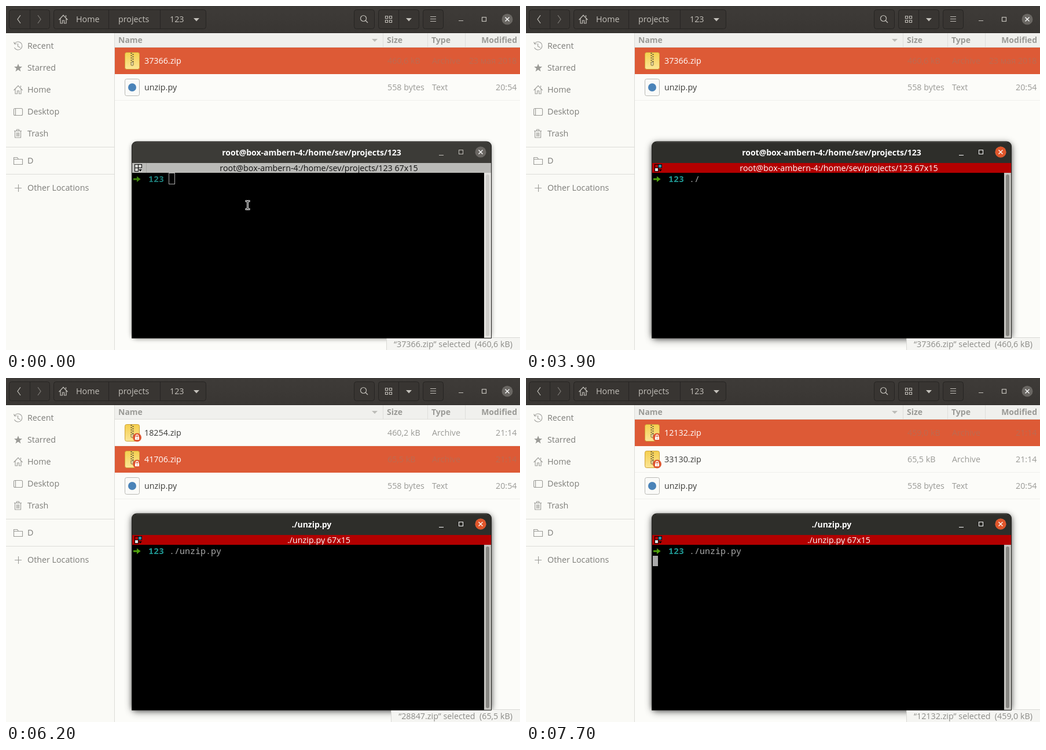
An HTML page that plays this animation: 888x596 px, repeating every 8000 ms.

```html
<!DOCTYPE html>
<html lang="en">
<head>
<meta charset="utf-8">
<title>Unzip script</title>
<style>
html, body { margin: 0; width: 100%; height: 100%; overflow: hidden; background: #fcfcf9; }
svg { display: block; width: 888px; height: 596px; }
text { font: 14.3px "Open Sans", "Noto Sans", sans-serif; white-space: pre; }
.b { font-weight: 700; font-size: 14px; }
.mono { font: 15px "Noto Sans Mono", "DejaVu Sans Mono", monospace; }
.mid { text-anchor: middle; }
.end { text-anchor: end; }
.line { fill: none; stroke: currentColor; }
</style>
</head>
<body>
<svg id="stage" viewBox="0 0 888 596">
  <defs>
    <linearGradient id="gold" x2="0" y2="1">
      <stop stop-color="#f5cf4e"/><stop offset="1" stop-color="#fbe596"/>
    </linearGradient>
    <linearGradient id="bar" x2="0" y2="1">
      <stop stop-color="#3e3b38"/><stop offset="1" stop-color="#393633"/>
    </linearGradient>
    <g id="zip">
      <rect x="205.5" y="8.5" width="25" height="29" rx="3" fill="url(#gold)" stroke="#cda136"/>
      <path d="M216.5 9v17M219.5 11v15" stroke="#6b6040" stroke-width="2" stroke-dasharray="2 2"/>
      <rect x="216" y="25" width="4" height="6" rx="1" fill="#e9d9a0" stroke="#7b6b3c"/>
    </g>
    <g id="page">
      <rect x="205.5" y="8.5" width="25" height="29" rx="3" fill="#fafaf8" stroke="#b9b9b5"/>
    </g>
    <g id="doc">
      <use href="#page"/>
      <path d="M210 16.5h12M210 19.5h16M210 22.5h15M210 25.5h16M210 28.5h9M210 31.5h8" stroke="#c6c6c3"/>
    </g>
    <g id="py"><use href="#page"/><circle cx="218" cy="23" r="7" fill="#4a83b8"/></g>
    <g id="lock">
      <circle cx="226.5" cy="31" r="7.5" fill="#de5833"/>
      <path d="M224.5 30v-1.5a2 2 0 0 1 4 0v1.5" fill="none" stroke="#fff" stroke-width="1.3"/>
      <rect x="223" y="30" width="7" height="5" rx=".5" fill="#fff"/>
      <path d="M226.5 31.5v2" stroke="#de5833"/>
    </g>
  </defs>

  <rect width="888" height="596" fill="#fcfcf9"/>
  <rect y="47" width="187" height="549" fill="#fafaf6"/>
  <path d="M187.5 47v549M0 244.5h187M0 291.5h187" stroke="#dcdcd8"/>

  <!-- file manager bar -->
  <rect width="888" height="47" fill="url(#bar)"/>
  <path d="M0 46.5h888" stroke="#2d2a28"/>
  <g id="buttons" fill="#383532" stroke="#262422"></g>
  <path d="M41.5 7v33M177.5 7v33M266.5 7v33M678.5 7v33" stroke="#262422"/>
  <g color="#c3c0ba" stroke-width="1.2">
    <path class="line" d="M25 16l-5 7 5 7"/>
    <path class="line" d="M55 16l5 7-5 7" color="#7f7c77"/>
    <path class="line" d="M91.5 24l7.500-8 7.500 8M94 22v8h3.500v-5h3v5h3.500v-8M103.500 19v-3"/>
    <circle class="line" cx="617.500" cy="21.500" r="5"/><path class="line" d="M621 25l4 4"/>
    <path class="line" d="M655.500 17.500h4v4h-4zM662.500 17.500h4v4h-4zM655.500 24.500h4v4h-4zM662.500 24.500h4v4h-4z"/>
    <path class="line" d="M733 18.500h10M733 22.500h10M733 26.500h10M782 25.500h8"/>
    <rect class="line" x="822.500" y="19.500" width="7" height="7"/>
    <path d="M324 21h10l-5 5.500zM691 21h10l-5 5.500z" fill="currentColor"/>
  </g>
  <circle cx="866" cy="23" r="9.500" fill="#6a6763"/>
  <path d="M862.500 19.500l7 7m0-7l-7 7" stroke="#fff" stroke-width="1.400"/>
  <g fill="#c3c0ba">
    <text x="121" y="28">Home</text><text x="194" y="28">projects</text><text x="283" y="28">123</text>
  </g>

  <!-- sidebar -->
  <g color="#9b9b97" stroke-width="1.100">
    <path class="line" d="M15 65a7 7 0 1 1-.5 7M13.500 62.500l1.500 3.500 3.500-.5M20.500 65v5l4 2"/>
    <path d="M21 100l2 5h5l-4 3.500 1.500 5-4.500-3-4.500 3 1.500-5-4-3.500h5z" fill="currentColor"/>
    <path class="line" d="M13.500 146l7.500-8 7.500 8M16 144v8h3.500v-5h3v5h3.500v-8M25.500 141v-3"/>
    <rect class="line" x="13.500" y="177.500" width="15" height="12" rx="2"/><path class="line" d="M16.500 178v11"/>
    <path class="line" d="M14 216.500h13M18.500 216v-2h4v2M15.500 217v11h10v-11M18.500 219v7M20.500 219v7M22.500 219v7"/>
    <path class="line" d="M13.500 274.500v-12h6l2 3h7v9zM13.500 265.500h8"/>
    <path class="line" d="M15 315.500h12M21.500 309v13"/>
  </g>
  <g id="places" fill="#7d7d79"></g>

  <!-- list -->
  <rect x="188" y="47" width="700" height="24" fill="#f0f0ed"/>
  <path d="M188 71.500h700M651.500 47v24M728.500 47v24M793.500 47v24" stroke="#dededa"/>
  <path d="M632 57h10l-5 5z" fill="#bcbcb8"/>
  <g fill="#9a9a96">
    <text class="b" x="194" y="64">Name</text><text class="b" x="658" y="64">Size</text>
    <text class="b" x="735" y="64">Type</text><text class="b end" x="883" y="64">Modified</text>
  </g>
  <g id="list"></g>

  <g id="shade">
    <rect x="218" y="238" width="620" height="338" rx="8" style="filter:blur(4px)" opacity=".5"/>
    <rect id="glow" x="217" y="238" width="622" height="341" rx="8" style="filter:blur(7px)" opacity="0"/>
  </g>
  <rect id="statusBox" y="574.500" height="23" fill="#f5f5f2" stroke="#d9d9d5"/>
  <text id="status" class="end" x="875" y="591" fill="#8b8b87"></text>

  <!-- terminal -->
  <path d="M217.500 575.500V243a8 8 0 0 1 8-8h605a8 8 0 0 1 8 8v332.500z" fill="#3c3b37" stroke="#22211f"/>
  <g id="active">
    <path d="M218 272v-29a8 8 0 0 1 8-8h604a8 8 0 0 1 8 8v29z" fill="#2e2e2a"/>
  </g>
  <path d="M225 236.500h606" stroke="#555450" stroke-opacity=".6"/>
  <circle cx="820" cy="253" r="9.500" fill="#6a6763"/>
  <circle id="close" cx="820" cy="253" r="9.500" fill="#e0562b"/>
  <path d="M816.500 249.500l7 7m0-7l-7 7" stroke="#fff" stroke-width="1.400"/>
  <g id="controls" class="line"><path d="M748 258.500h8"/><rect x="782.500" y="249.500" width="7" height="7"/></g>
  <text id="title" class="b mid" x="528" y="259" fill="#fff"></text>
  <rect id="tab" x="218" y="272" width="620" height="17"/>
  <g id="tabIcon">
    <rect x="222" y="274" width="13" height="13"/>
    <rect class="p" x="223" y="275" width="5" height="5"/><rect class="p" x="229" y="275" width="5" height="5"/>
    <rect class="p" x="223" y="281" width="5" height="5"/><rect class="p" x="229" y="281" width="6" height="6"/>
    <path d="M229 283h6l-3 3.500z"/>
  </g>
  <path id="tabEdge" d="M242.500 272v17" stroke="#a7a7a3"/>
  <text id="tabText" class="mid" x="540.500" y="286"></text>
  <rect x="218" y="289" width="608" height="286"/>
  <rect x="826" y="289" width="12" height="286" fill="#e4e3e0"/>
  <rect x="829" y="292" width="6" height="280" rx="3" fill="#cfcecb"/>
  <g id="scroll">
    <rect x="826" y="289" width="12" height="286" fill="#c5c4c0"/>
    <rect x="829" y="292" width="6" height="280" rx="3" fill="#878682"/>
  </g>
  <g id="prompt">
    <path d="M220 298.500h6v-3.500l6.500 5-6.500 5v-3.500h-6z"/>
    <text class="mono" id="dir" x="246" y="305" font-weight="700" style="font-weight:700">123</text>
  </g>
  <text class="mono" id="typed" x="282" y="305" fill="#aaa"></text>
  <rect id="cursor"/>
  <g id="pointer" fill="none">
    <path d="M413.500 338h3l1 1 1-1h3M417.500 338v14M413.500 352h3l1-1 1 1h3" stroke="#fff" stroke-width="3"/>
    <path d="M414.500 338h2l1 1 1-1h2M417.500 338v14M414.500 352h2l1-1 1 1h2" stroke="#000"/>
  </g>
</svg>
<script>
const LOOP = 8000;
const $ = id => document.getElementById(id);
const PATH = 'root@box-ambern-4:/home/sev/projects/123';

// Each table: [start ms, value...]
const FOCUS = [[0, 0], [800, .25], [900, .5], [1000, .75], [1100, 1]];
const TYPED = [[0, ''], [3400, './'], [4400, './u'], [4500, './unz'], [4800, './unzip.py ']];
const BLINK = [[0, 1], [1400, 0], [2000, 1], [3100, 0], [3400, 1], [3900, 0], [4400, 1],
  [6100, 0], [6500, 1], [7100, 0], [7700, 1]];

const file = (name, size, date = '21:14', lock = true) => ({
  name: name + '.zip', size, date, lock,
  type: size === '0 bytes' ? 'Text' : 'Archive',
  icon: size === '0 bytes' ? 'doc' : 'zip'
});
const first = file('37366', '460,6 kB', '23 мая 2018', false);
const script = { name: 'unzip.py', size: '558 bytes', type: 'Text', date: '20:54', icon: 'py' };
const SMALL = '65,5 kB', NONE = '0 bytes';

// [start, files, selected row, status name, status size]
const VIEWS = [
  [0, [first], 0, '37366', '460,6 kB'],
  [5500, [file('5900', NONE), first], 1, '37366', '460,6 kB'],
  [5900, [file('5900', '460,4 kB'), file('30581', NONE)], 1, '37366', '460,6 kB'],
  [6100, [file('18254', '460,2 kB'), file('28847', SMALL)], 1, '30581', '460,4 kB'],
  [6200, [file('18254', '460,2 kB'), file('41706', SMALL)], 1, '28847', SMALL],
  [6300, [file('10493', '460,0 kB'), file('41706', SMALL)], 1, '41706', SMALL],
  [6800, [file('13811', '459,8 kB'), file('45133', SMALL)], 1, '45133', SMALL],
  [6900, [file('13811', '459,8 kB'), file('26074', '459,6 kB')], 1, '26074', '459,6 kB'],
  [7000, [file('17320', '459,4 kB'), file('26074', '459,6 kB')], 1, '26074', '459,6 kB'],
  [7100, [file('17320', '459,2 kB'), file('33130', NONE)], 1, '24690', '459,2 kB'],
  [7300, [file('12132', '459,0 kB'), file('33130', SMALL)], 1, '24690', '459,2 kB'],
  [7500, [file('12132', '459,0 kB'), file('33130', SMALL)], 1, '33130', NONE],
  [7700, [file('12132', '459,0 kB'), file('33130', SMALL)], 0, '12132', '459,0 kB']
];

const at = (table, t) => table.findLast(step => step[0] <= t);
const set = (el, attrs) => { for (const k in attrs) el.setAttribute(k, attrs[k]); };

$('buttons').innerHTML = [[5, 71], [82, 264], [601, 36], [643, 71], [720, 36]]
  .map(([x, w]) => `<rect x="${x + .5}" y="6.5" width="${w - 1}" height="33" rx="4"/>`).join('');
$('places').innerHTML = [['Recent', 74], ['Starred', 112], ['Home', 150], ['Desktop', 188],
  ['Trash', 226], ['D', 273], ['Other Locations', 320]]
  .map(([s, y]) => `<text x="37" y="${y}">${s}</text>`).join('');

function row(f, i, selected) {
  const dim = selected ? '#bd6a50' : '#9a9a96';
  const back = selected
    ? '<rect x="188" width="700" height="46" fill="#dd5a36"/>'
    : '<path d="M188 45.5h700" stroke="#efefec"/>';
  return `<g transform="translate(0 ${72 + 46 * i})">${back}<use href="#${f.icon}"/>
    ${f.lock ? '<use href="#lock"/>' : ''}
    <text x="239" y="28" fill="${selected ? '#fff' : '#3b3b38'}">${f.name}</text>
    <g fill="${dim}"><text x="659" y="28">${f.size}</text><text x="736" y="28">${f.type}</text>
    <text class="end" x="882.500" y="28">${f.date}</text></g></g>`;
}

let shown;
function drawView(view) {
  if (view === shown) return;
  shown = view;
  const [, files, sel, name, size] = view;
  $('list').innerHTML = [...files, script].map((f, i) => row(f, i, i === sel)).join('');
  $('status').textContent = `“${name}.zip” selected  (${size})`;
  const x = Math.round(875 - $('status').getComputedTextLength() - 13) + .5;
  set($('statusBox'), { x, width: 890 - x });
}

function drawTerminal(t) {
  const focus = at(FOCUS, t)[1], on = focus > 0;
  for (const id of ['active', 'close', 'scroll']) set($(id), { opacity: focus });
  set($('glow'), { opacity: .4 * focus });
  $('controls').style.color = on ? '#fff' : '#c3c0ba';

  const title = t < 5300 ? PATH : './unzip.py';
  $('title').textContent = title;
  $('tabText').textContent = title + ' 67x15';
  set($('tabText'), { fill: on ? '#fff' : '#111' });
  set($('tab'), { fill: on ? '#b30000' : '#babab7' });
  set($('tabEdge'), { opacity: on ? 0 : 1 });
  const panes = on ? ['#b30000', '#2a91a8', '#e4e4e4', '#b30000'] : Array(4).fill('#d4d4d1');
  $('tabIcon').querySelectorAll('.p').forEach((p, i) => set(p, { fill: panes[i] }));

  set($('prompt'), { fill: on ? '#4fa30c' : '#3f850d' });
  set($('dir'), { fill: on ? '#1f9893' : '#1d7e7a' });
  const typed = at(TYPED, t)[1];
  $('typed').textContent = typed;

  const running = t >= 5500;
  const x = running ? 219 : 282 + 9 * typed.length, y = running ? 308 : 290;
  set($('cursor'), on
    ? { x, y, width: 9, height: 18, fill: '#aaa', stroke: 'none', opacity: at(BLINK, t)[1] }
    : { x: x - .5, y: y - .5, width: 10, height: 19, fill: 'none', stroke: '#aaa', opacity: 1 });
  set($('pointer'), { opacity: t < 3400 ? 1 : 0 });
}

const start = performance.now();
function frame() {
  const t = (performance.now() - start) % LOOP;
  drawView(at(VIEWS, t));
  drawTerminal(t);
  requestAnimationFrame(frame);
}
frame();
</script>
</body>
</html>
```
